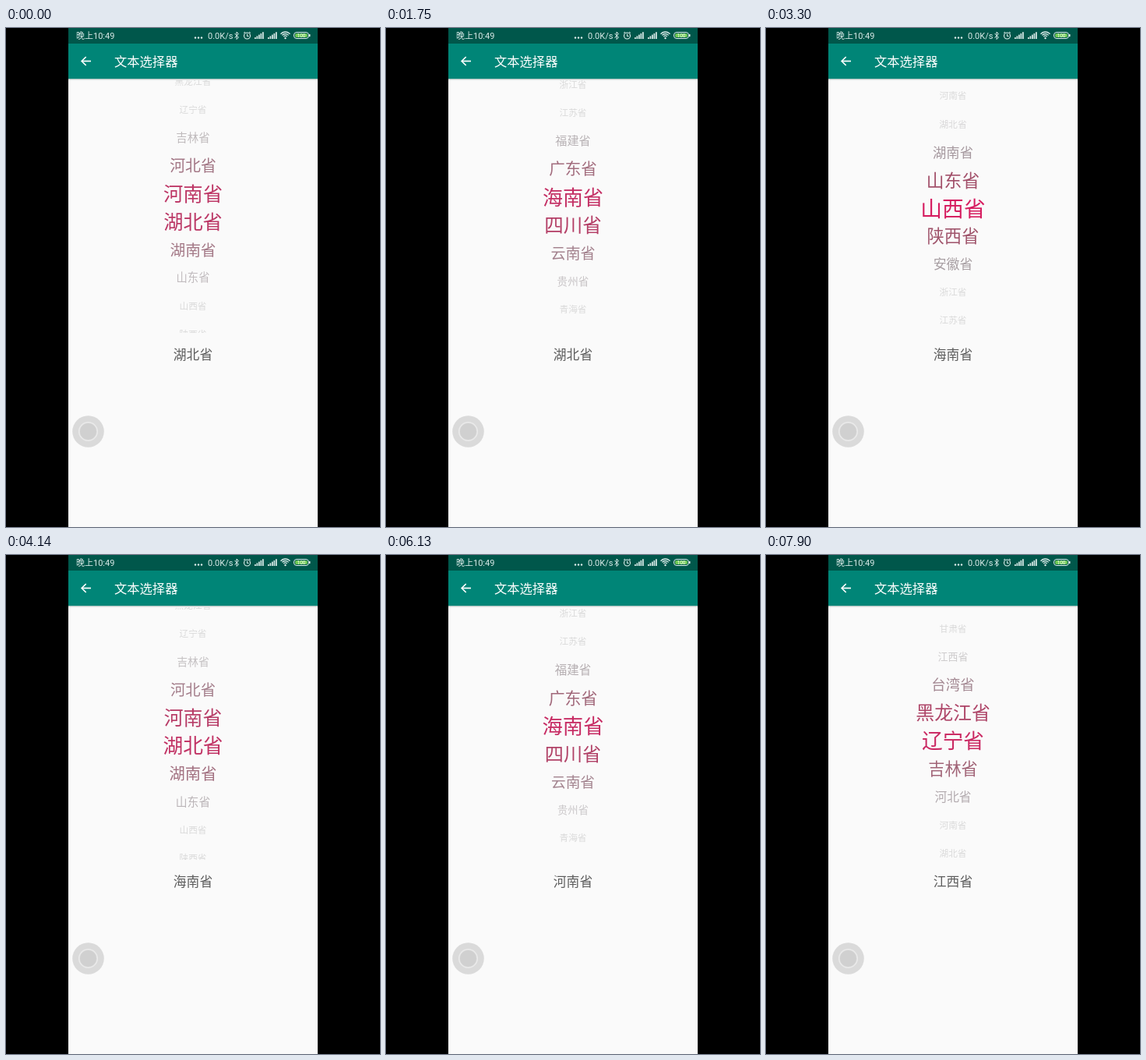
These frames come from a looping animation (480x640 px, 8000 ms). An HTML page with a canvas:

```html
<!DOCTYPE html>
<html lang="zh-CN">
<head>
<meta charset="utf-8">
<style>
  html, body { margin: 0; width: 100%; height: 100%; overflow: hidden; background: #000; }
  canvas { display: block; }
</style>
</head>
<body>
<canvas id="stage" width="480" height="640"></canvas>
<script>
const ctx = document.getElementById('stage').getContext('2d');
const CJK = '"Noto Sans CJK SC", "Noto Sans CJK", sans-serif';
const LATIN = 'Roboto, "Noto Sans CJK SC", sans-serif';
const LOOP = 8000, CENTER_X = 240, CENTER_Y = 229.5, ROW = 36;
const PAPER = '#fafafa', PALE = '#dcebe9';

const provinces = ('黑龙江 辽宁 吉林 河北 河南 湖北 湖南 山东 山西 陕西 安徽 浙江 ' +
  '江苏 福建 广东 海南 四川 云南 贵州 青海 甘肃 江西 台湾').split(' ').map(name => name + '省');
const province = i => provinces[((i % provinces.length) + provinces.length) % provinces.length];

function stepAt(t) {
  const shifted = t + 80, rest = shifted % 140;
  return Math.floor(shifted / 140) * 3 + (rest >= 100) + (rest >= 120);
}

// Swipes in steps and rows: the finger drags to `grip`, then the wheel flings on to `to`.
const swipes = [
  { start: -3, release: 4, from: 5, grip: 3, to: -8 },
  { start: 54.5, release: 60, from: 15, grip: 14, to: 4 },
  { start: 103, release: 110, from: 4, grip: 6.5, to: 17 },
  { start: 158, release: 164.5, from: 17, grip: 20, to: 30 }
];

// Selected row shown below the wheel, from the given step on.
const picks = [
  { step: 0, row: 5 }, { step: 53, row: 15 }, { step: 106, row: 4 },
  { step: 157, row: 17 }, { step: 166, row: 21 }
];

const bezier = (x, p1, p2) => 3 * x * (1 - x) * ((1 - x) * p1 + x * p2) + x ** 3;

// Scroller deceleration, equal to cubic-bezier(.175, .5, .35, 1).
function flingEase(p) {
  let low = 0, high = 1;
  for (let i = 0; i < 20; i++) {
    const mid = (low + high) / 2;
    if (bezier(mid, 0.175, 0.35) < p) low = mid; else high = mid;
  }
  return bezier(low, 0.5, 1);
}

const latest = (list, key, step) => list.filter(item => item[key] <= step).pop();

function wheelPosition(step) {
  const { start, release, from, grip, to } = latest(swipes, 'start', step);
  if (step < release) return from + (grip - from) * ((step - start) / (release - start)) ** 1.6;
  const duration = 17.2 * Math.abs(to - grip) ** 0.424;
  const p = (step - release) / duration;
  return p >= 1 ? to : grip + (to - grip) * flingEase(p);
}

// Row colours at whole-row distances from the centre.
const tints = [[216, 27, 96], [160, 82, 106], [165, 155, 160], [218, 218, 218]];

function tint(distance) {
  const d = Math.min(distance, 2.999), i = Math.floor(d);
  return `rgb(${tints[i].map((c, k) => Math.round(c + (tints[i + 1][k] - c) * (d - i)))})`;
}

function text(str, x, y, size, color, align = 'center', family = CJK) {
  ctx.font = `${size}px ${family}`;
  ctx.textAlign = align;
  ctx.fillStyle = color;
  ctx.fillText(str, x, y + size * 0.38);
}

function rect(x, y, w, h, color) {
  ctx.fillStyle = color;
  ctx.fillRect(x, y, w, h);
}

function line(points, width, color) {
  ctx.beginPath();
  points.forEach(([x, y]) => ctx.lineTo(x, y));
  ctx.lineWidth = width;
  ctx.strokeStyle = color;
  ctx.stroke();
}

function arc(x, y, r, from = 0, to = Math.PI * 2) {
  ctx.beginPath();
  ctx.arc(x, y, r, from, to);
}

function disc(x, y, r, color) {
  arc(x, y, r);
  ctx.fillStyle = color;
  ctx.fill();
}

function ring(x, y, r, width, color, from, to) {
  arc(x, y, r, from, to);
  ctx.lineWidth = width;
  ctx.strokeStyle = color;
  ctx.stroke();
}

function drawWheel(position) {
  ctx.save();
  ctx.beginPath();
  ctx.rect(80, 65, 320, 326);
  ctx.clip();
  const nearest = Math.round(position);
  for (let i = nearest - 5; i <= nearest + 5; i++) {
    const offset = i - position, d = Math.abs(offset);
    text(province(i), CENTER_X, CENTER_Y + offset * ROW, Math.max(11.7, 28 - 5.45 * d), tint(d));
  }
  ctx.restore();
}

function drawStatusBar() {
  rect(80, 0, 320, 20, '#00574b');
  text('晚上10:49', 90, 10, 11, PALE, 'left', LATIN);
  for (const x of [243, 247, 251]) disc(x, 12.5, 1.2, PALE);
  text('0.0K/s', 259, 10, 11, PALE, 'left', LATIN);
  line([[293.5, 7], [298.5, 12], [296, 14.5], [296, 5], [298.5, 7.5], [293.5, 12.5]], 1, PALE);

  ring(309.5, 10, 4, 1.1, PALE);
  line([[309.5, 7.5], [309.5, 10.5], [311.5, 10.5]], 1, PALE);
  line([[305, 6.5], [307, 5]], 1, PALE);
  line([[312, 5], [314, 6.5]], 1, PALE);

  for (const x of [319, 336]) {
    for (let i = 0; i < 5; i++) rect(x + i * 2.5, 12 - i * 1.7, 1.7, 2 + i * 1.7, PALE);
  }
  for (const r of [3, 5.5, 8]) ring(358.5, 13, r, 1.3, PALE, -Math.PI * 0.77, -Math.PI * 0.23);
  disc(358.5, 13, 1.2, PALE);

  ctx.beginPath();
  ctx.roundRect(369.5, 5.5, 19, 8, 3.5);
  ctx.lineWidth = 1;
  ctx.strokeStyle = PALE;
  ctx.stroke();
  ctx.beginPath();
  ctx.roundRect(371, 7, 16, 5, 2);
  ctx.fillStyle = '#6fc955';
  ctx.fill();
  rect(389, 8, 1.5, 3, PALE);
  text('100', 379, 9.5, 6.5, '#fff', 'center', LATIN);
}

function drawToolbar() {
  rect(80, 20, 320, 45, '#008577');
  rect(80, 65, 320, 1, '#b4c6c4');
  rect(80, 66, 320, 1, '#e2e6e5');
  line([[109, 42.5], [97.5, 42.5]], 1.7, '#fff');
  line([[102.7, 37], [97.2, 42.5], [102.7, 48]], 1.7, '#fff');
  text('文本选择器', 139, 43, 16.3, '#fff', 'left');
}

function drawFloatingBall() {
  disc(105.5, 517.5, 20.3, '#dadada');
  disc(105.5, 517.5, 10.5, '#d0d0d0');
  ring(105.5, 517.5, 11.8, 1.5, '#eaeaea');
}

function draw(t) {
  const step = stepAt(t);
  rect(0, 0, 480, 640, '#000');
  rect(80, 0, 320, 640, PAPER);
  drawWheel(wheelPosition(step));
  text(province(latest(picks, 'step', step).row), CENTER_X, 419, 16.8, '#5c5c5c');
  drawFloatingBall();
  drawToolbar();
  drawStatusBar();
}

const began = performance.now();
function tick() {
  draw((performance.now() - began) % LOOP);
  requestAnimationFrame(tick);
}
tick();
</script>
</body>
</html>
```
